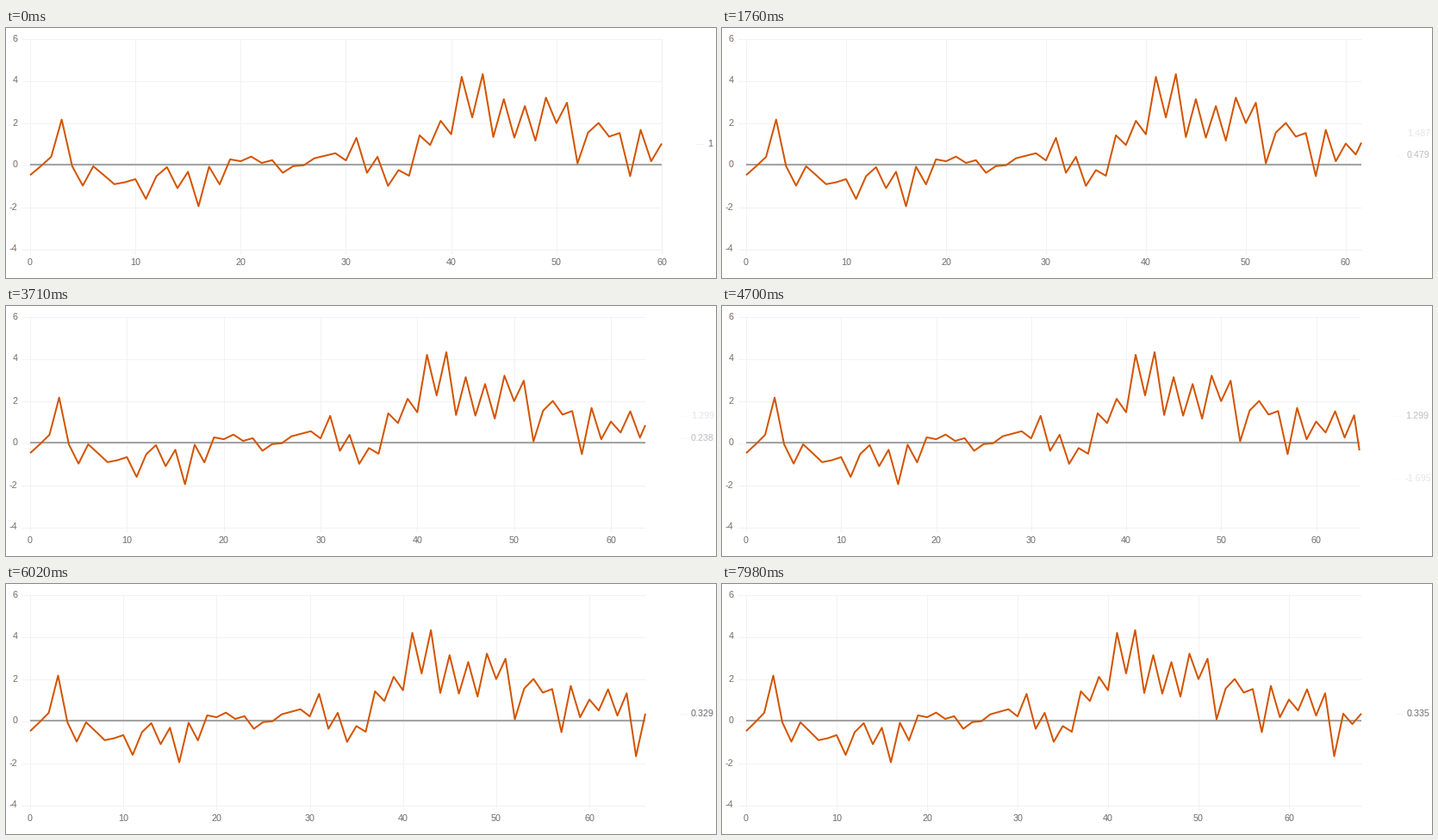
Recreate the animation shown at these times as a matplotlib script. Size 824 px wide and 291 px high, loop 8000 ms.

```python
import numpy as np
import matplotlib.pyplot as plt
from matplotlib.animation import FuncAnimation

W, H, DPI = 824, 291, 100
PX = 72 / DPI
LOOP, STEP = 8000, 20
LEFT, ZERO_Y, UNIT = 28, 159, 24.5

VALUES = np.array([
    -0.5, -0.08, 0.37, 2.14, -0.08, -1.0, -0.08, -0.5, -0.93, -0.84,
    -0.69, -1.63, -0.55, -0.12, -1.12, -0.34, -1.98, -0.1, -0.94, 0.25,
    0.16, 0.38, 0.08, 0.21, -0.39, -0.07, -0.03, 0.3, 0.42, 0.54,
    0.2, 1.27, -0.39, 0.37, -1.01, -0.26, -0.53, 1.39, 0.93, 2.08,
    1.44, 4.17, 2.24, 4.3, 1.31, 3.11, 1.28, 2.78, 1.14, 3.18,
    1.97, 2.94, 0.06, 1.52, 1.98, 1.33, 1.5, -0.55, 1.65, 0.16,
    1, 0.479, 1.487, 0.238, 1.299, -1.695, 0.329, -0.165, 0.335])
INDEX = np.arange(len(VALUES))
FIRST = 60

# (start ms, end ms, visible steps) of each slide to the next point
SLIDES = [(540, 980, 5), (1550, 1970, 5), (2530, 2950, 5), (3500, 4040, 6),
          (4480, 5020, 6), (5460, 6020, 6), (6450, 7000, 6), (7440, 7980, 6)]

GRID, AXIS, LINE = "#f2f2f2", "#a2a5a2", "#d35400"
TEXT, TEXT_Y = "#6c6c6c", "#7d6a60"

plt.rcParams["font.family"] = "Liberation Sans"
plt.rcParams["font.size"] = 10.7 * PX

fig = plt.figure(figsize=(W / DPI, H / DPI), dpi=DPI, facecolor="white")
ax = fig.add_axes([0, 0, 1, 1])
ax.set_xlim(0, W)
ax.set_ylim(H, 0)
ax.axis("off")


def y_px(v):
    return ZERO_Y - UNIT * v


def rule(color, width=1, z=1):
    line, = ax.plot([], [], color=color, lw=width * PX, zorder=z,
                    solid_capstyle="butt")
    return line


def label(text="", x=0, y=0, ha="left", color=TEXT):
    return ax.text(x, y, text, ha=ha, va="center", color=color)


def value_text(v):
    return f"{v:.4g}"


def right_edge(v):
    """Plot edge, leaving room for the value label."""
    text = value_text(v)
    if len(text) == 1:
        return 761
    return 738 if v < 0 else 742


def ease(u):
    return 4 * u ** 3 if u < 0.5 else 1 - 4 * (1 - u) ** 3


def position(t):
    """Index of the current point and progress to the next one."""
    k, p = FIRST, 0
    for start, end, steps in SLIDES:
        if t < start:
            break
        if t >= end:
            k, p = k + 1, 0
        else:
            n = min(int((t - start) // 105), steps - 2)
            p = ease(0.25 + 0.135 * n)
    return k, p


y_ticks = range(-4, 7, 2)
x_ticks = range(0, 61, 10)
h_lines = [rule(GRID) for _ in y_ticks]
v_lines = [rule(GRID) for _ in x_ticks]
x_labels = [label(str(n), y=272.5, ha="center") for n in x_ticks]
for n in y_ticks:
    label(str(n), 13.5, y_px(n) + 0.5, "right", TEXT_Y)

zero = rule(AXIS, 2, 2)
curve = rule(LINE, 2, 3)
curve.set_solid_joinstyle("round")
tags = [(rule(GRID), label()) for _ in range(2)]


def set_tag(tag, v, edge, alpha):
    tick, text = tag
    y = y_px(v)
    tick.set_data([edge + 39, edge + 49], [y + 0.5, y + 0.5])
    text.set_text(value_text(v))
    text.set_position((edge + 53, y + 0.5))
    for part in tag:
        part.set_alpha(alpha)
        part.set_visible(alpha > 0.01)


def draw(i):
    k, p = position(i * STEP + STEP / 2)
    old, new = VALUES[k], VALUES[min(k + 1, len(VALUES) - 1)]
    last = k + p
    edge = right_edge(old) + p * (right_edge(new) - right_edge(old))
    scale = (edge - LEFT) / last

    for n, line in zip(y_ticks, h_lines):
        line.set_data([18, edge], [y_px(n) + 0.5] * 2)
    for n, line, text in zip(x_ticks, v_lines, x_labels):
        x = LEFT + n * scale
        line.set_data([x, x], [12, 263])
        text.set_x(x)
    zero.set_data([LEFT, edge], [ZERO_Y, ZERO_Y])

    xs = np.append(INDEX[INDEX < last], last)
    curve.set_data(LEFT + xs * scale, y_px(np.interp(xs, INDEX, VALUES)))

    set_tag(tags[0], old, edge, 1 - p)
    set_tag(tags[1], new, edge, p ** 3)
    return []


anim = FuncAnimation(fig, draw, frames=LOOP // STEP, interval=STEP,
                     repeat=True, repeat_delay=0, blit=False)
plt.show()
```
